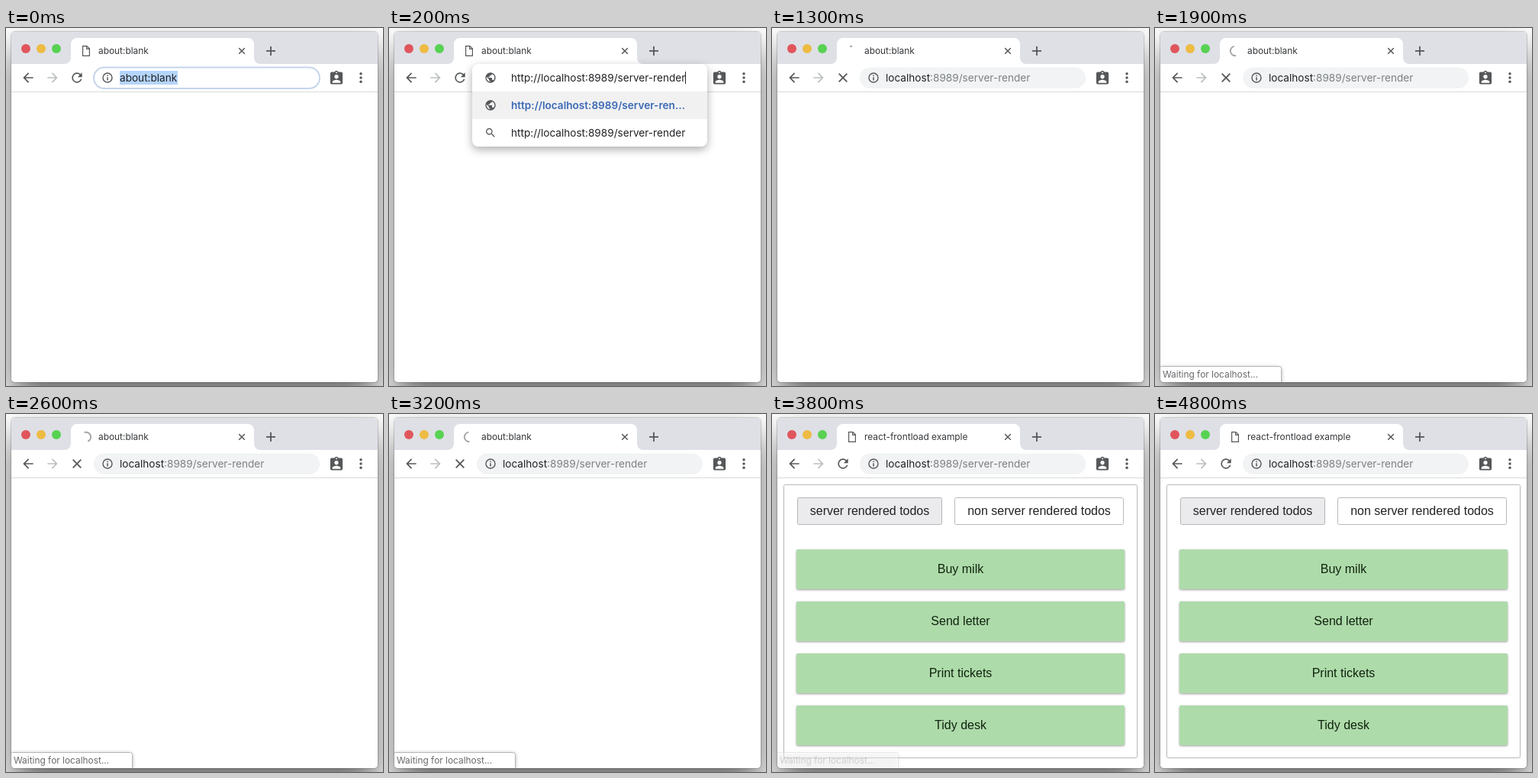
Recreate the animation shown at these times as an HTML page with a canvas. Size 494 by 468 pixels, loop 5 s.

```html
<!DOCTYPE html>
<html lang="en">
<head>
<meta charset="utf-8">
<title>Server render demo</title>
<style>
html, body { margin: 0; width: 100%; height: 100%; overflow: hidden; background: #fff; }
canvas { display: block; width: 494px; height: 468px; }
</style>
</head>
<body>
<canvas id="stage"></canvas>
<script>
const W = 494, H = 468, LOOP = 5000, STEP = 100;
const PASTE = 100, ENTER = 1000, NAVIGATE = 1200, RENDERED = 3300, LOADED = 3400;
const UI = 'Inter, sans-serif', PAGE = '"Liberation Sans", Arial, sans-serif';
const URL_HOST = 'localhost', URL_REST = ':8989/server-render';
const FULL_URL = 'http://' + URL_HOST + URL_REST;
const INK = '#555759', DARK = '#202124', GREY = '#7c8084';
const TODOS = ['Buy milk', 'Send letter', 'Print tickets', 'Tidy desk'];

const ICONS = {
  arrow: 'M20 11H7.8l5.6-5.6L12 4l-8 8 8 8 1.4-1.4L7.8 13H20z',
  reload: 'M17.65 6.35A8 8 0 1 0 19.73 14h-2.08A6 6 0 1 1 16.22 7.78L13 11h7V4z',
  search: 'M15.5 14h-.8l-.3-.3A6.5 6.5 0 1 0 13.7 14.4l.3.3v.8l5 5 1.5-1.5zm-6 0a4.5 4.5 0 1 1 .01 0z',
  globe: 'M12 2a10 10 0 1 0 .01 0zM11 19.9A8 8 0 0 1 4.2 10.2L9 15v1a2 2 0 0 0 2 2zM17.9 17.4A2 2 0 0 0 16 16h-1v-3a1 1 0 0 0-1-1H8v-2h2a1 1 0 0 0 1-1V7h2a2 2 0 0 0 2-2v-.4A8 8 0 0 1 17.9 17.4z',
  badge: 'M19 3h-4.2a3 3 0 0 0-5.6 0H5a2 2 0 0 0-2 2v14a2 2 0 0 0 2 2h14a2 2 0 0 0 2-2V5a2 2 0 0 0-2-2zM12 3a1 1 0 1 1-.01 0zM12 7a3 3 0 1 1-.01 0zM18 19H6v-1.4c0-2 4-3.1 6-3.1s6 1.1 6 3.1z'
};
for (const key in ICONS) ICONS[key] = new Path2D(ICONS[key]);

const canvas = document.getElementById('stage');
const ctx = canvas.getContext('2d');
const ratio = window.devicePixelRatio || 1;
canvas.width = W * ratio;
canvas.height = H * ratio;

function box(x, y, w, h, r, fill, stroke, width = 1) {
  ctx.beginPath();
  ctx.roundRect(x, y, w, h, r);
  if (fill) { ctx.fillStyle = fill; ctx.fill(); }
  if (stroke) { ctx.strokeStyle = stroke; ctx.lineWidth = width; ctx.stroke(); }
}

function withShadow(color, blur, dy, draw) {
  ctx.save();
  ctx.shadowColor = color;
  ctx.shadowBlur = blur * ratio;
  ctx.shadowOffsetY = dy * ratio;
  draw();
  ctx.restore();
}

function disc(x, y, r, fill) {
  ctx.beginPath();
  ctx.arc(x, y, r, 0, Math.PI * 2);
  ctx.fillStyle = fill;
  ctx.fill();
}

function line(color, width, ...points) {
  ctx.beginPath();
  points.forEach(([x, y], i) => i ? ctx.lineTo(x, y) : ctx.moveTo(x, y));
  ctx.strokeStyle = color;
  ctx.lineWidth = width;
  ctx.stroke();
}

function cross(x, y, r, color, width) {
  line(color, width, [x - r, y - r], [x + r, y + r]);
  line(color, width, [x + r, y - r], [x - r, y + r]);
}

// Draws the string and returns the x where it ends.
function text(str, x, y, font, color, align = 'left') {
  ctx.font = font;
  ctx.textAlign = align;
  ctx.fillStyle = color;
  ctx.fillText(str, x, y);
  return x + ctx.measureText(str).width;
}

function icon(name, x, y, size, color, flip = 1) {
  ctx.save();
  ctx.translate(x, y);
  ctx.scale(flip * size / 24, size / 24);
  ctx.translate(-12, -12);
  ctx.fillStyle = color;
  ctx.fill(ICONS[name], 'evenodd');
  ctx.restore();
}

function drawWindow() {
  ctx.fillStyle = '#fff';
  ctx.fillRect(0, 0, W, H);
  withShadow('rgba(0,0,0,.6)', 46, 24, () => box(7, 5, 480, 458, 5, '#fff'));
  box(6.5, 4.5, 481, 459, 5, null, 'rgba(0,0,0,.16)');
  box(7, 5, 480, 458, 5, '#fff');
  box(7, 5, 480, 42, [5, 5, 0, 0], '#dee0e6');
  ['#e0565c', '#eebb43', '#58d252'].forEach((c, i) => disc(26 + i * 20, 27, 6, c));

  ctx.beginPath();
  ctx.moveTo(77, 47);
  ctx.arcTo(85, 47, 85, 39, 8);
  ctx.arcTo(85, 13, 93, 13, 8);
  ctx.arcTo(325, 13, 325, 21, 8);
  ctx.arcTo(325, 47, 333, 47, 8);
  ctx.lineTo(333, 47);
  ctx.fillStyle = '#fff';
  ctx.fill();

  cross(309, 30, 3.8, INK, 1.5);
  line(INK, 1.8, [341, 30], [353, 30]);
  line(INK, 1.8, [347, 24], [347, 36]);
  line('#d9dadc', 1, [7, 83.5], [487, 83.5]);
  icon('arrow', 29, 65, 20, INK);
  icon('arrow', 61, 65, 20, '#bcbec0', -1);
  icon('badge', 433, 65.5, 21.5, INK);
  [59.7, 65, 70.3].forEach(y => disc(465, y, 1.7, INK));
}

function drawTab(t) {
  const title = t < RENDERED ? 'about:blank'
    : t < LOADED ? URL_HOST + URL_REST : 'react-frontload example';
  text(title, 121, 34, '11.9px ' + UI, '#36383b');

  if (t >= NAVIGATE && t < LOADED) drawSpinner(t - NAVIGATE);
  else {
    line(INK, 1.2, [106, 23.6], [100.6, 23.6], [100.6, 36.4], [109.4, 36.4], [109.4, 27], [106, 23.6]);
    line(INK, 1.2, [105.7, 23.6], [105.7, 27.4], [109.4, 27.4]);
  }
  if (t >= NAVIGATE && t < LOADED) cross(93, 65, 5.3, INK, 1.8);
  else icon('reload', 93, 65, 20, INK);
}

// The head turns steadily counter-clockwise; the tail follows half a turn behind.
function drawSpinner(elapsed) {
  const head = Math.PI * 2 * elapsed / 1320;
  const tail = Math.max(head - Math.PI, 0);
  const top = -Math.PI / 2;
  ctx.beginPath();
  ctx.arc(105, 30, 6.2, top - tail, top - head, true);
  ctx.strokeStyle = '#a3a5a8';
  ctx.lineWidth = 1.9;
  ctx.stroke();
}

function drawInfo() {
  ctx.beginPath();
  ctx.arc(133, 65, 6, 0, Math.PI * 2);
  ctx.strokeStyle = INK;
  ctx.lineWidth = 1.4;
  ctx.stroke();
  line(INK, 1.5, [133, 64.3], [133, 68.4]);
  line(INK, 1.5, [133, 61.6], [133, 63.1]);
}

function drawAddress(t) {
  const font = '13.6px ' + UI;
  if (t < PASTE) {
    box(115, 51.5, 296, 27.5, 13.75, '#fff', '#c6d5eb', 2);
    ctx.fillStyle = '#b5d5fb';
    ctx.fillRect(149, 56, 76, 18);
    text('about:blank', 149, 70, font, DARK);
  } else {
    box(115, 51.5, 296, 27.5, 13.75, '#f1f3f4');
    const x = text(URL_HOST, 149, 70, font, DARK);
    text(URL_REST, x, 70, font, GREY);
  }
  drawInfo();
}

function drawSuggestions(t) {
  const font = '13.6px ' + UI;
  withShadow('rgba(0,0,0,.32)', 12, 4, () => box(109, 47, 308, 108, 8, '#fff'));
  ctx.fillStyle = '#f1f1f2';
  ctx.fillRect(109, 83, 308, 36);
  icon('globe', 133, 65, 16, INK);
  icon('globe', 133, 101, 16, INK);
  icon('search', 133, 137, 16, INK);

  const dim = t >= ENTER ? GREY : DARK;
  let x = text('http://', 160, 70, font, dim);
  x = text(URL_HOST, x, 70, font, DARK);
  x = text(URL_REST, x, 70, font, dim);
  if (t < 600) line(DARK, 1, [Math.round(x) + .5, 57], [Math.round(x) + .5, 73]);
  text('http://localhost:8989/server-ren…', 160, 106, '600 13.6px ' + UI, '#3c69b4');
  text(FULL_URL, 160, 142, font, DARK);
}

function drawPage() {
  const font = '16px ' + PAGE;
  box(15.5, 92.5, 463, 357, 2, '#fff', '#b9b9b9');
  box(33.5, 109.5, 189, 35, 2, '#ebebed', '#b5b5b7');
  box(239.5, 109.5, 221, 35, 2, '#fff', '#b9b9b9');
  text('server rendered todos', 128, 132, font, '#222', 'center');
  text('non server rendered todos', 350, 132, font, '#222', 'center');
  TODOS.forEach((todo, i) => {
    const y = 177 + i * 68;
    withShadow('rgba(0,0,0,.4)', 3, 1, () => box(32, y, 430, 52, 2, '#aedbaa'));
    text(todo, 247, y + 31, font, '#10240f', 'center');
  });
}

function drawStatus(t) {
  const shown = Math.min((t - 1500) / 200, (3900 - t) / 400, 1);
  if (shown <= 0) return;
  ctx.save();
  ctx.beginPath();
  ctx.roundRect(7, 430, 480, 33, [0, 0, 5, 5]);
  ctx.clip();
  ctx.globalAlpha = shown;
  withShadow('rgba(0,0,0,.35)', 5, 1, () => box(5.5, 442.5, 160, 24, 3, '#fff'));
  box(5.5, 442.5, 160, 24, 3, '#fff', '#b4b5b7');
  text('Waiting for localhost...', 10, 457, '11.9px ' + UI, '#66696d');
  ctx.restore();
}

function draw(t) {
  ctx.setTransform(ratio, 0, 0, ratio, 0, 0);
  drawWindow();
  drawTab(t);
  drawAddress(t);
  if (t >= PASTE && t < NAVIGATE) drawSuggestions(t);
  if (t >= RENDERED) drawPage();
  drawStatus(t);
}

const start = performance.now();
function tick() {
  const t = (performance.now() - start) % LOOP;
  draw(Math.floor(t / STEP) * STEP);
  requestAnimationFrame(tick);
}
tick();
</script>
</body>
</html>
```
